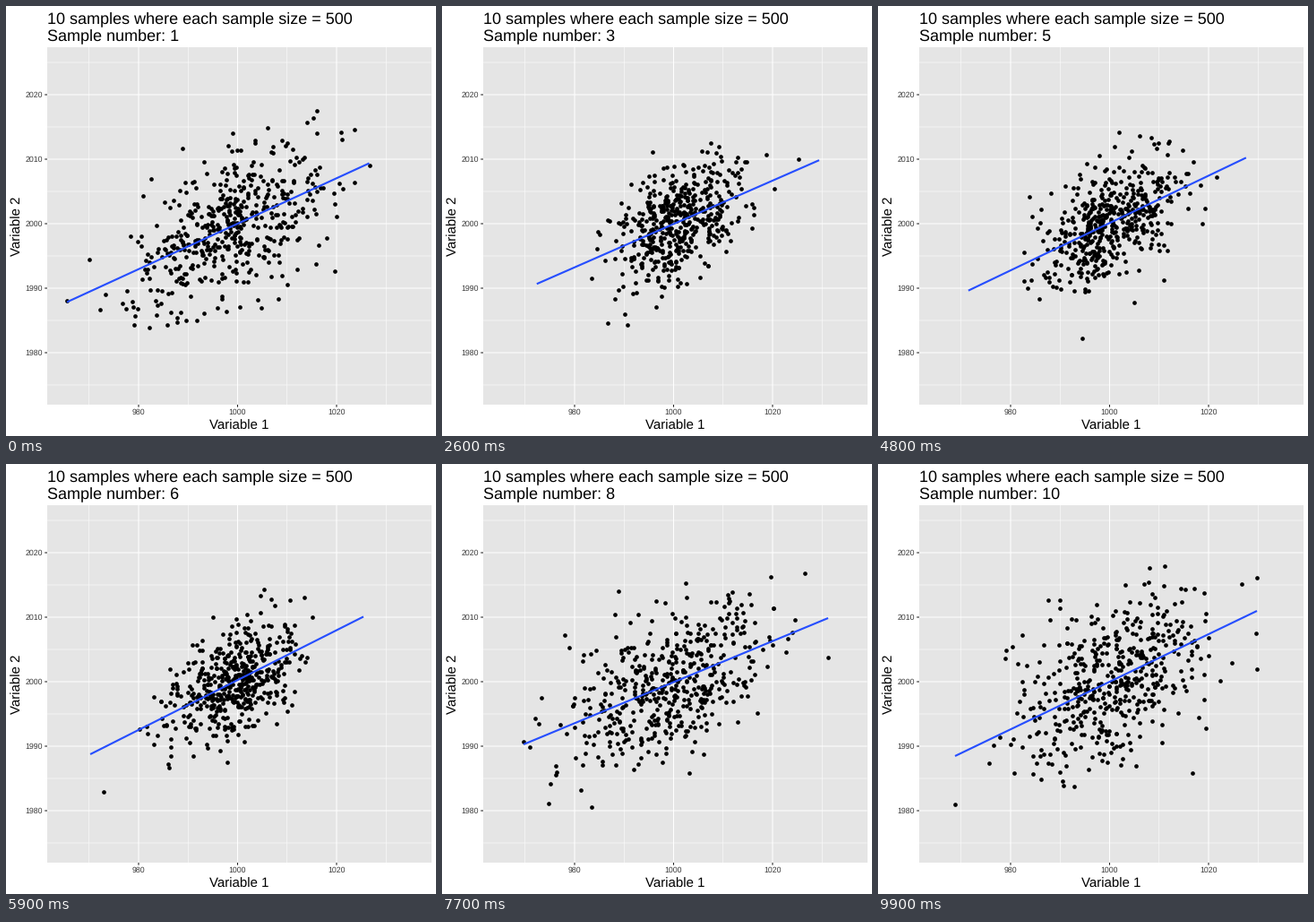
Animation, 480 px wide and 480 px high, one loop 10 s. Source, as a matplotlib script:

```python
import matplotlib.pyplot as plt
import numpy as np
from matplotlib.animation import FuncAnimation
from matplotlib.patches import Rectangle

SIZE, DPI = 480, 100
PX = 72 / DPI
STEPS, N = 11, 500
LEFT, TOP, RIGHT, BOTTOM = 46, 46, 474.5, 445
CENTRE_X = 258.5
NOISE = 41
TICK, TICK_TEXT, BLUE = "#222222", "#393939", "#264eff"

plt.rcParams["font.family"] = "Liberation Sans"
plt.rcParams["text.hinting"] = "none"

# Ends of each sample's regression line, in pixels: x0, y0, x1, y1
FITS = np.array([
    (68, 330.5, 405.5, 175.5), (96, 329, 455, 133),
    (112, 303.5, 413, 180.5), (95, 322, 435, 157.5),
    (98.5, 317.5, 422.5, 167), (105, 318, 390.5, 173.5),
    (75, 334.5, 414, 165), (91, 313, 431, 172),
    (66, 333, 427, 166), (86, 326, 423, 164),
])


def make_sample(rng, fit):
    """Noisy points around a line whose x range spans the whole line."""
    x0, y0, x1, y1 = fit
    z = rng.normal(size=N)
    x = CENTRE_X + np.where(z < 0, z / z.min() * (x0 - CENTRE_X),
                            z / z.max() * (x1 - CENTRE_X))
    noise = rng.normal(size=N)
    y = y0 + (y1 - y0) * (x - x0) / (x1 - x0)
    return np.column_stack([x, y + NOISE * (noise - noise.mean())])


rng = np.random.default_rng(7)
CLOUDS = np.array([make_sample(rng, fit) for fit in FITS])

fig = plt.figure(figsize=(SIZE / DPI, SIZE / DPI), dpi=DPI, facecolor="white")
ax = fig.add_axes([0, 0, 1, 1])
ax.set(xlim=(0, SIZE), ylim=(SIZE, 0))
ax.axis("off")


def rule(xs, ys, width=1.07, color="white"):
    ax.plot(xs, ys, color=color, lw=width * PX, zorder=1,
            solid_capstyle="butt", snap=False)


def label(x, y, text, size, color="black", **kw):
    return ax.text(x, y, text, fontsize=size * PX, color=color, **kw)


ax.add_patch(Rectangle((LEFT, TOP), RIGHT - LEFT, BOTTOM - TOP,
                       fc="#e5e5e5", lw=0, zorder=0))

# Minor grid
for i in range(4):
    x = 92.75 + 110.5 * i
    rule([x, x], [TOP, BOTTOM], 0.55)
for i in range(6):
    y = 63 + 72 * i
    rule([LEFT, RIGHT], [y, y], 0.55)

# Major grid, ticks and tick labels
for i in range(3):
    x = 148 + 110.5 * i
    rule([x, x], [TOP, BOTTOM])
    rule([x, x], [BOTTOM, BOTTOM + 2.75], color=TICK)
    label(x, 455.7, str(980 + 20 * i), 8.8, TICK_TEXT, ha="center")
for i in range(5):
    y = 99 + 72 * i
    rule([LEFT, RIGHT], [y, y])
    rule([LEFT - 2.75, LEFT], [y, y], color=TICK)
    label(41, y + 3.2, str(2020 - 10 * i), 8.8, TICK_TEXT, ha="right")

label(260, 472.5, "Variable 1", 15, ha="center")
label(16.7, 245.5, "Variable 2", 15, ha="center", va="baseline",
      rotation=90, rotation_mode="anchor")
label(46, 19, "10 samples where each sample size = 500", 18)
counter = label(46, 38, "", 18)

dots = ax.scatter(*CLOUDS[0].T, s=(4.7 * PX) ** 2, c="black", lw=0, zorder=3)
trend, = ax.plot([], [], color=BLUE, lw=2.13 * PX, zorder=4,
                 solid_capstyle="butt")


def update(frame):
    k, step = divmod(frame, STEPS)
    t = step / STEPS
    nxt = min(k + 1, len(FITS) - 1)
    dots.set_offsets((1 - t) * CLOUDS[k] + t * CLOUDS[nxt])
    x0, y0, x1, y1 = (1 - t) * FITS[k] + t * FITS[nxt]
    trend.set_data([x0, x1], [y0, y1])
    counter.set_text(f"Sample number: {round(k + 1 + t)}")
    return dots, trend, counter


anim = FuncAnimation(fig, update, frames=STEPS * (len(FITS) - 1) + 1,
                     interval=100, repeat=True, repeat_delay=0)
plt.show()
```
